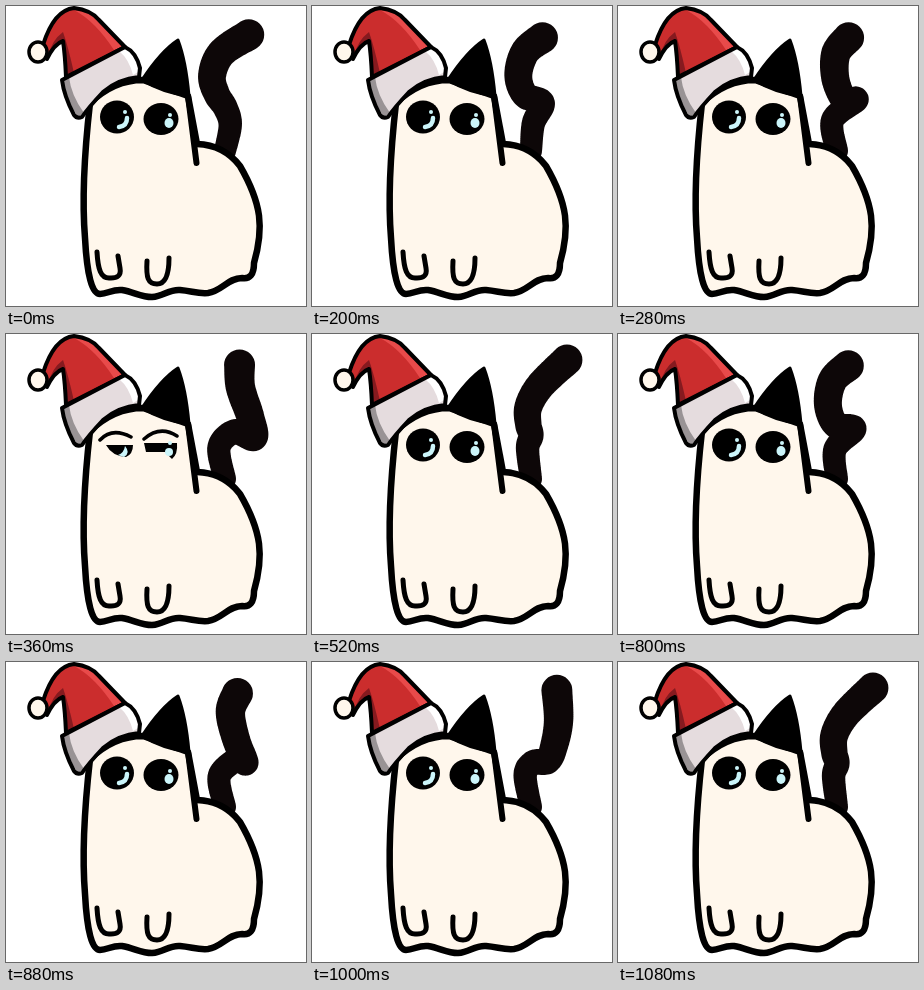
These frames come from a looping animation (300 px wide and 300 px high, 1120 ms). An HTML page:

```html
<!DOCTYPE html>
<html lang="en">
<head>
<meta charset="utf-8">
<title>Ghost cat</title>
<style>
  html, body { margin: 0; width: 100%; height: 100%; overflow: hidden; background: #fff; }
  svg { display: block; width: 100vw; height: 100vh; }
  .line { stroke: #000; stroke-linecap: round; stroke-linejoin: round; }
  .bare { fill: none; }
  .cream { fill: #fff7ec; }
  .shine { fill: #cbf5fa; }
  #tail { fill: #0d0708; }

  /* One blink every second swing of the tail. */
  #open, #half, #shut { animation: 1120ms step-end infinite; }
  #open { animation-name: open; }
  #half { animation-name: half; }
  #shut { animation-name: shut; }
  @keyframes open { 0%, 39.286% { opacity: 1 } 32.143% { opacity: 0 } }
  @keyframes half { 0%, 35.714%, 42.857% { opacity: 0 } 32.143% { opacity: 1 } 39.286% { opacity: 0 } }
  @keyframes shut { 0%, 39.286% { opacity: 0 } 35.714% { opacity: 1 } }
</style>
</head>
<body>
<svg viewBox="0 0 300 300">
  <path id="tail"/>

  <!-- body -->
  <path class="line cream" stroke-width="6.5" d="M84 97 C78 150 76 195 79 232 Q82 288 94 288 C102 288 106 283 116 284 C128 286 135 291 146 291 C158 290 163 283 174 284 C186 285 192 288 202 287 C216 285 222 272 236 272 Q248 274 248 257 C258 222 256 198 234 160 Q218 139 191 138 L182 90 L137 74 Q108 74 84 97Z"/>
  <path class="line" stroke-width="3" d="M136 74 Q155 45 172 34 Q180 55 183 90 Q157 87 136 74Z"/>
  <path class="line bare" stroke-width="6" d="M182 90 L190.500 157"/>
  <path class="line bare" stroke-width="5" d="M91 246 C92 264 95 272 103 272 Q116 273 114 262 L112 250 M141 255 C140 272 142 278 151 278 Q163 278 163 252"/>

  <!-- eyes -->
  <g id="open">
    <ellipse cx="111" cy="111" rx="17" ry="16.500"/>
    <ellipse cx="155" cy="113" rx="17.500" ry="16"/>
    <path class="bare" stroke="#cbf5fa" stroke-width="4.500" stroke-linecap="round" d="M121 112 Q121 120 113 121"/>
    <ellipse class="shine" cx="163" cy="117" rx="4.500" ry="5"/>
    <circle class="shine" cx="119" cy="106" r="2"/>
    <circle class="shine" cx="164" cy="109" r="2"/>
  </g>
  <g id="half">
    <path class="line bare" stroke-width="3.500" d="M94 106 Q106 93 125 103 M138 105 Q154 91 171 102"/>
    <path d="M100 111 H127 Q127 120 120 123 Q106 122 100 111Z M138 109 H171 Q172 120 166 125 L159 118 H140Z"/>
    <path class="shine" d="M119 112 Q125 119 118 123 L112 121 Q118 119 119 112Z"/>
    <circle class="shine" cx="164" cy="109" r="2"/>
    <ellipse class="shine" cx="163" cy="118" rx="4" ry="4"/>
  </g>
  <path id="shut" class="line bare" stroke-width="4" d="M94 113 Q111 122 128 113 M138 114 Q154 123 171 113"/>

  <!-- hat -->
  <path id="cap" fill="#cb2d2d" d="M37 39 Q48 4 68 2 Q85 4 93 14 L119 41 L60 71 Q59 48 57 35 Q48 38 41 53Z"/>
  <path fill="#e84a4a" d="M68 4 Q84 6 91 14 L116 41 L108 44 Q89 15 68 4Z"/>
  <path fill="#861a1f" d="M57 26 Q62 40 68 67 L60 71 Q59 48 57 35 Q48 38 42 50 Q46 34 57 26Z"/>
  <path class="line bare" stroke-width="4" d="M37 39 Q48 4 68 2 Q85 4 93 14 L119 41 L60 71 Q59 48 57 35 Q48 38 41 53Z"/>
  <path fill="#e5dcde" d="M56 74 L119 41 Q130 46 134 62 L133 71 Q112 73 97 86 Q82 102 76 111 Q71 113 68 109 Q58 90 56 74Z"/>
  <path fill="#fff" d="M113 45 L120 42 Q130 48 132 66 L127 69 Q123 53 113 45Z"/>
  <path fill="#999395" d="M57 74 L63 71 Q65 89 78 107 L72 111 Q61 96 57 74Z"/>
  <path class="line bare" stroke-width="4" d="M56 74 L119 41 Q130 46 134 62 L133 71 Q112 73 97 86 Q82 102 76 111 Q71 113 68 109 Q58 90 56 74Z"/>
  <ellipse class="line cream" cx="32" cy="46" rx="9" ry="10" stroke-width="3.500"/>
</svg>
<script>
const STEP = 40, SWING = 14;
const tail = document.getElementById("tail");

// Joints from tip to base; a pulse pushes each by dx, dy, peaking at its phase in degrees.
const joint = (x, y, dx, dy, phase) => ({ x, y, dx, dy, phase });
const joints = [
  joint(229, 32, 26, -6, 305),
  joint(211, 45, 36, 13, 250),
  joint(202, 68, 48, 16, 230),
  joint(208, 87, 41, 17, 215),
  joint(218, 102, 20, -8, 150),
  joint(212, 113, 19, 9, 45),
  joint(219, 145, 0, 0, 0)
];

// Smooth pulse that is 1 at angle 0 and nearly 0 on the far side.
const pulse = deg => Math.exp(1.5 * (Math.cos(deg * Math.PI / 180) - 1));

const spline = (a, b, c, d, t) =>
  b + t / 2 * (c - a + t * (2 * a - 5 * b + 4 * c - d + t * (3 * (b - c) + d - a)));

const disc = (x, y, r) => `M${x - r} ${y}a${r} ${r} 0 1 0 ${2 * r} 0a${r} ${r} 0 1 0 ${-2 * r} 0`;

function drawTail(turn) {
  const pts = joints.map(j => {
    const g = pulse(turn * 360 - j.phase);
    return [j.x + j.dx * g, j.y + j.dy * g];
  });
  const last = pts.length - 1, detail = 16;
  const at = i => pts[Math.max(0, Math.min(last, i))];
  let d = "";
  for (let n = 0; n <= last * detail; n++) {
    const i = Math.floor(n / detail), t = n / detail - i;
    const [x, y] = [0, 1].map(k => spline(at(i - 1)[k], at(i)[k], at(i + 1)[k], at(i + 2)[k], t));
    d += disc(x, y, 15.5 - 4.5 * n / (last * detail));
  }
  tail.setAttribute("d", d);
}

function draw() {
  const now = document.timeline.currentTime ?? performance.now();
  const blink = document.getElementById("open").getAnimations()[0];
  const time = blink?.currentTime ?? now;
  drawTail(Math.floor(time / STEP) % SWING / SWING);
  requestAnimationFrame(draw);
}
draw();
</script>
</body>
</html>
```
